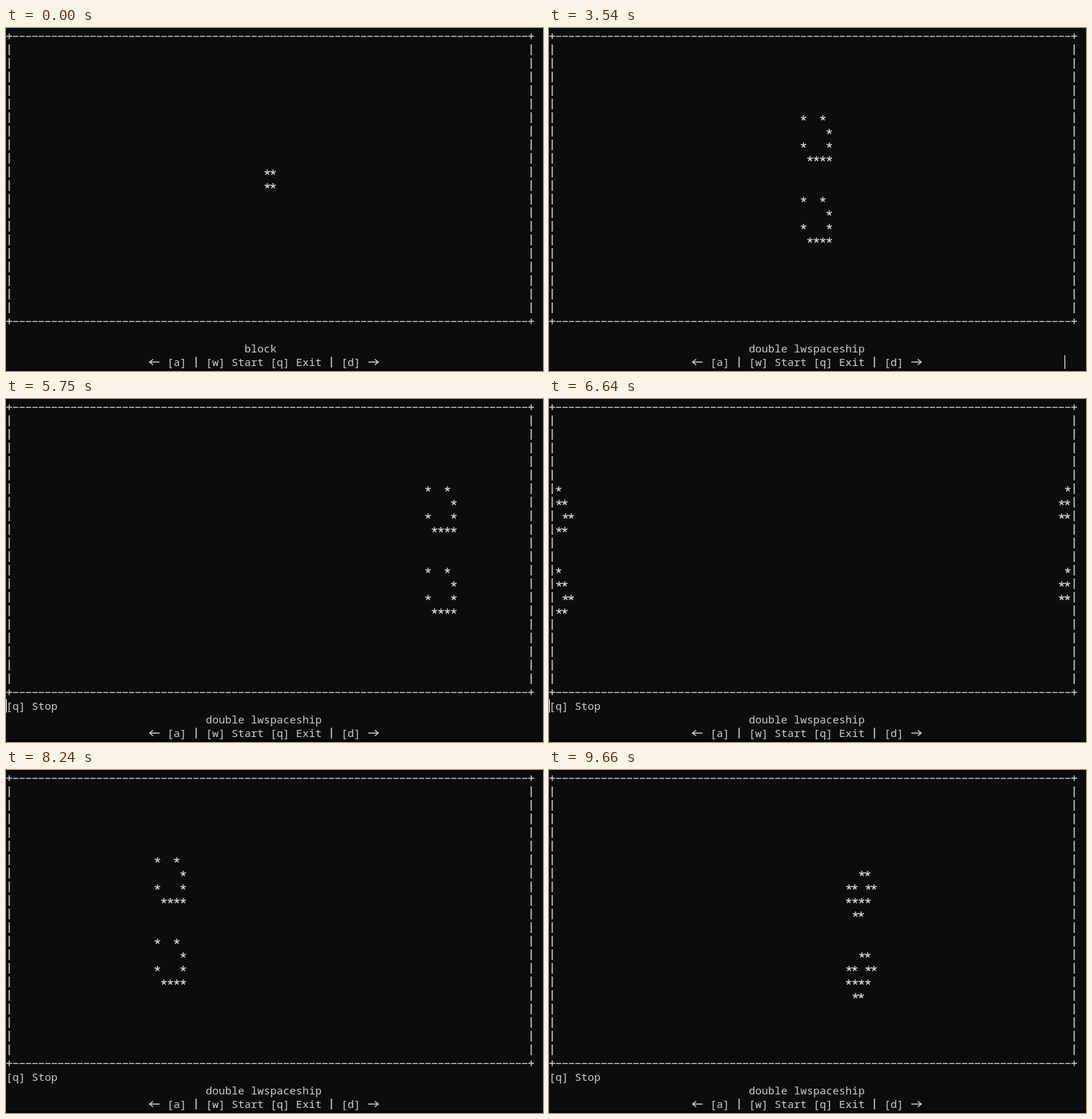
An HTML page with a canvas for the animation above (9730 ms loop, 750 by 480 pixels).

```html
<!DOCTYPE html>
<html lang="en">
<head>
<meta charset="utf-8">
<title>Game of Life in a terminal</title>
<style>
  html, body { margin: 0; width: 750px; height: 480px; overflow: hidden; background: #0c0c0c; }
  canvas { display: block; }
</style>
</head>
<body>
<canvas id="stage" width="750" height="480"></canvas>
<script>
const ctx = document.getElementById('stage').getContext('2d');
const LOOP = 9730, RUN = 4080;
const COLS = 80, ROWS = 20, CW = 9, CH = 19;

const ship = '*  * /    */*   */ ****';
// cells appear at, title appears at, title, cells
const menu = [
  [0, 0, 'block', '**/**'],
  [620, 620, 'beehive', ' ** /*  */ ** '],
  [1050, 1090, 'blinker', '***'],
  [1530, 1600, 'toad', ' ***/*** '],
  [1970, 2010, 'glider', ' * /  */***'],
  [2470, 2470, 'lwspaceship', ship],
  [2970, 3010, 'double glider', ' *    * /  *    */***  ***'],
  [3510, 3540, 'double lwspaceship', ship + '///' + ship]
];

// time and generation; linear in between
const pace = [[RUN, 0], [4900, 25], [5750, 52], [7530, 106], [8970, 151], [9660, 173]];

function place(pattern) {
  const lines = pattern.split('/');
  const top = Math.ceil((ROWS - lines.length) / 2);
  const left = Math.ceil((COLS - lines[0].length) / 2);
  return Array.from({ length: ROWS }, (_, r) =>
    (' '.repeat(left) + (lines[r - top] || '')).padEnd(COLS));
}

function step(grid) {
  const alive = (r, c) => grid[(r + ROWS) % ROWS][(c + COLS) % COLS] === '*';
  return grid.map((row, r) => [...row].map((cell, c) => {
    let n = 0;
    for (let y = -1; y < 2; y++)
      for (let x = -1; x < 2; x++)
        if ((x || y) && alive(r + y, c + x)) n++;
    return n === 3 || (n === 2 && cell === '*') ? '*' : ' ';
  }).join(''));
}

const still = menu.map(m => place(m[3]));
const life = [still[still.length - 1]];
while (life.length < 174) life.push(step(life[life.length - 1]));

function generation(t) {
  const i = pace.findIndex(p => p[0] > t);
  if (i < 0) return 173;
  const [t0, g0] = pace[i - 1], [t1, g1] = pace[i];
  return Math.floor(g0 + (g1 - g0) * (t - t0) / (t1 - t0) + 0.1);
}

const latest = (t, key) => menu.filter(m => m[key] <= t).length - 1;

const text = (s, col, row) => ctx.fillText(s, col * CW, row * CH + 17);
const bar = (col, row) => ctx.fillRect(col * CW + 3.7, row * CH + 4, 1.6, 15);

function lines(...paths) {
  ctx.beginPath();
  for (const p of paths) p.forEach(([x, y], i) => i ? ctx.lineTo(x, y) : ctx.moveTo(x, y));
  ctx.stroke();
}

function star(x, y) {
  lines(...[0, 1, 2, 3, 4].map(k => {
    const a = (k * 0.4 - 0.5) * Math.PI;
    return [[x, y], [x + 4 * Math.cos(a), y + 4 * Math.sin(a)]];
  }));
}

function arrow(tip, dir) {
  const y = 467.5, head = tip - 5 * dir;
  lines([[tip - 14 * dir, y], [tip, y]], [[head, y - 4], [tip, y], [head, y + 4]]);
}

function frame() {
  for (const row of [0, 21]) {
    const y = row * CH + 11.5;
    for (let c = 1; c <= COLS; c++) ctx.fillRect(c * CW + 0.8, y - 0.5, 7.4, 1.3);
    for (const x of [4.5, 733.5]) lines([[x - 4, y], [x + 4, y]], [[x, y - 4], [x, y + 4]]);
  }
  for (let r = 1; r <= ROWS; r++) { bar(0, r); bar(81, r); }
}

function cells(grid) {
  grid.forEach((row, r) => {
    for (const run of row.matchAll(/\*+/g)) {
      const n = run[0].length;
      for (let i = 0; i < n; i++) {
        const nudge = n === 2 ? 0.5 - i : 0; // pairs sit closer together
        star((run.index + i + 1) * CW + 4.5 + nudge, (r + 1) * CH + 12);
      }
    }
  });
}

function footer(title) {
  text(title, Math.floor(40 - title.length / 2), 23);
  text('[a]   [w] Start [q] Exit   [d]', 25, 24);
  bar(29, 24);
  bar(50, 24);
  arrow(200.5, -1);
  arrow(520, 1);
}

function cursor(t) {
  ctx.fillStyle = '#fff';
  if (t < RUN) {
    if (t >= 230) ctx.fillRect(720, 458, 1, CH);
  } else if ((t - 4235) % 1090 < 545) {
    ctx.fillRect(0, 420, 1, CH);
  }
}

function draw(now) {
  const t = now % LOOP;
  ctx.fillStyle = '#0c0c0c';
  ctx.fillRect(0, 0, 750, 480);
  ctx.fillStyle = '#080006';
  ctx.fillRect(0, 477, 750, 3);
  ctx.fillStyle = ctx.strokeStyle = '#ccc';
  ctx.lineWidth = 1.4;
  ctx.font = '15px "Noto Sans Mono", "DejaVu Sans Mono", monospace';
  frame();
  cells(t < RUN ? still[latest(t, 0)] : life[generation(t)]);
  if (t >= RUN) text('[q] Stop', 0, 22);
  footer(menu[latest(t, 1)][2]);
  cursor(t);
}

function tick() {
  draw(performance.now());
  requestAnimationFrame(tick);
}
tick();
</script>
</body>
</html>
```
